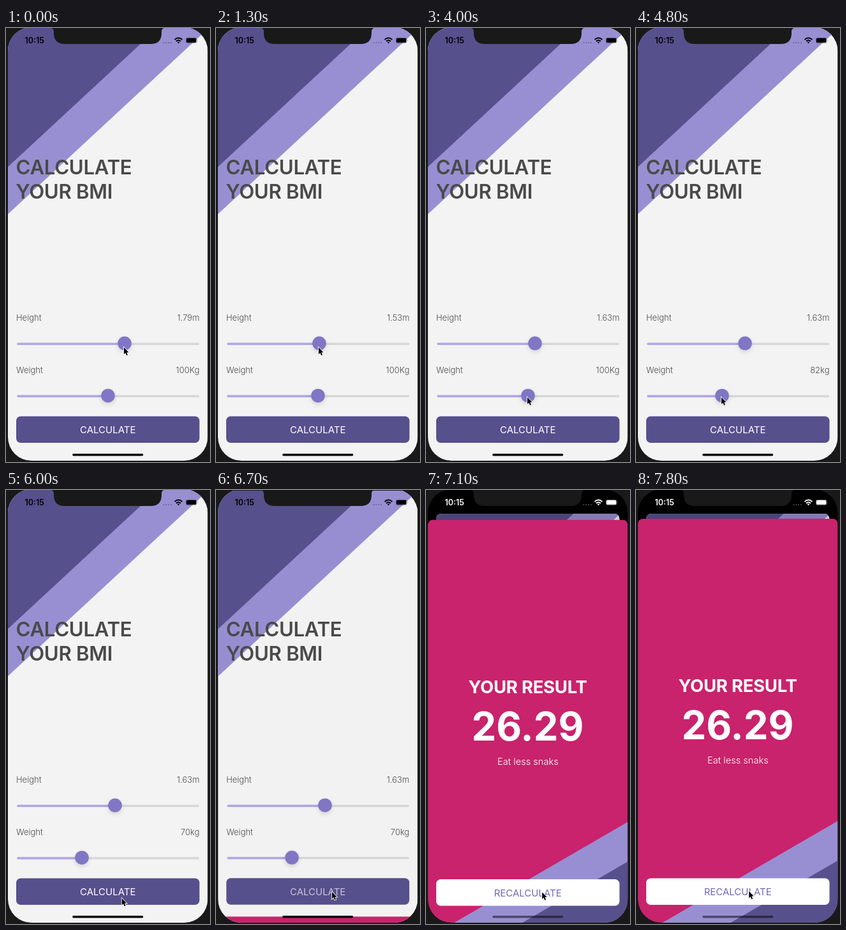
An HTML page that plays this animation: 320 px wide and 679 px high, repeating every 8 s.

```html
<!DOCTYPE html>
<html lang="en">
<head>
<meta charset="utf-8">
<title>BMI calculator</title>
<style>
  html, body { margin: 0; width: 100%; height: 100%; overflow: hidden; background: #191919; }
  svg { display: block; width: 100%; height: 100%; }
  text { font-family: Inter, "Liberation Sans", sans-serif; }
  .title { font-size: 31.2px; font-weight: 600; letter-spacing: -.01em; fill: #4a4a4a; }
  .label { font-size: 13px; font-weight: 300; fill: #4d4d4d; }
  .button { font-size: 15px; text-anchor: middle; }
  .right { text-anchor: end; }
  .mid { text-anchor: middle; fill: #fff; }
  .knob { fill: #8076c5; filter: drop-shadow(0 3px 3px rgba(0, 0, 0, .13)); }
  .track { stroke-width: 3.4; stroke-linecap: round; }
</style>
</head>
<body>
<svg viewBox="0 0 320 679">
  <defs>
    <clipPath id="screen"><rect x="3" y="-1" width="313.5" height="678" rx="37"/></clipPath>
    <clipPath id="cardClip"><rect id="cardShape" x="3" width="313.5" height="700"/></clipPath>
    <clipPath id="sheetClip"><rect x="3" y="45" width="313.5" height="700" rx="8"/></clipPath>
  </defs>
  <rect width="320" height="679" fill="#191919"/>
  <g clip-path="url(#screen)">
    <rect width="320" height="679"/>

    <g id="card"><g clip-path="url(#cardClip)">
      <rect width="320" height="679" fill="#f3f3f3"/>
      <path d="M0 0H318L0 294Z" fill="#988fd3"/>
      <path d="M0 0H238L0 220Z" fill="#56508d"/>
      <text class="title" x="15.5" y="229">CALCULATE</text>
      <text class="title" x="15.5" y="267">YOUR BMI</text>

      <text class="label" x="16" y="458">Height</text>
      <text class="label right" id="heightText" x="303.5" y="458"></text>
      <path class="track" d="M19 494.3H301.5" stroke="#d7d7d7"/>
      <path class="track" id="heightBar" stroke="#b2a7e5"/>
      <circle class="knob" id="heightKnob" cy="493.3" r="10.8"/>

      <text class="label" x="16" y="540">Weight</text>
      <text class="label right" id="weightText" x="303.5" y="540"></text>
      <path class="track" d="M19 576H301.5" stroke="#d7d7d7"/>
      <path class="track" id="weightBar" stroke="#b2a7e5"/>
      <circle class="knob" id="weightKnob" cy="575.2" r="10.8"/>

      <rect x="16" y="607.5" width="287.5" height="41.5" rx="7" fill="#56508d"/>
      <text class="button" id="calc" x="159.7" y="634" fill="#fff">CALCULATE</text>
      <rect id="dim" width="320" height="679"/>
    </g></g>

    <g id="sheet"><g clip-path="url(#sheetClip)">
      <rect y="45" width="320" height="700" fill="#c8236c"/>
      <path d="M320 515.7V745H-76Z" fill="#988fd3"/>
      <path d="M320 577.7V745H31Z" fill="#56508d"/>
      <text class="mid" x="159.5" y="316.3" font-size="27.5" font-weight="700" letter-spacing="-.28">YOUR RESULT</text>
      <text class="mid" x="159.5" y="390.2" font-size="61.5" font-weight="700">26.29</text>
      <text class="mid" x="159.9" y="428" font-size="14.6" font-weight="300">Eat less snaks</text>
      <rect x="16" y="607.5" width="287.5" height="41.5" rx="7" fill="#fff"/>
      <text class="button" x="159.7" y="634" fill="#7468be">RECALCULATE</text>
    </g></g>

    <path id="home" d="M106 667.8H213.5" stroke="#000" stroke-width="3.6" stroke-linecap="round"/>
    <path d="M68-1Q75 0 75 6V8Q75 25 92 25H227Q244 25 244 8V6Q244 0 251-1Z" fill="#191919"/>
    <g id="status">
      <text x="29.5" y="24" font-size="12.5" font-weight="600">10:15</text>
      <path d="M247.5 23H260" stroke="currentColor" stroke-opacity=".35" stroke-width="1.8" stroke-linecap="round" stroke-dasharray="0 3.8"/>
      <path d="M264.6 18.2Q270.5 12.8 276.4 18.2M267 20.8Q270.5 17.6 274 20.8" fill="none" stroke="currentColor" stroke-width="2"/>
      <path d="M268.6 22.2Q270.5 20.6 272.4 22.2L270.5 24.2Z"/>
      <rect x="282.4" y="15.4" width="16.6" height="8" rx="2.3" fill="none" stroke="currentColor" stroke-opacity=".45" stroke-width=".8"/>
      <rect x="283" y="16" width="15.4" height="6.8" rx="1.6"/>
      <path d="M300 18V21Q301.2 19.5 300 18Z" opacity=".5"/>
    </g>
  </g>
  <path id="cursor" d="M0 0V10.6L2.4 8.4 4.1 12.4 5.9 11.6 4.3 7.8H7.5Z" stroke="#fff" stroke-width="1.7" paint-order="stroke"/>
</svg>
<script>
const $ = id => document.getElementById(id);
const clamp = v => Math.max(0, Math.min(1, v));

// Eased value at time t along [time, value] keys
function track(t, ...keys) {
  let [t0, v0] = keys[0];
  for (const [t1, v1] of keys) {
    if (t < t1) {
      const p = clamp((t - t0) / (t1 - t0));
      return v0 + (v1 - v0) * p * p * (3 - 2 * p);
    }
    [t0, v0] = [t1, v1];
  }
  return v0;
}

// Critically damped spring
const spring = s => s <= 0 ? 0 : 1 - (1 + 20 * s) * Math.exp(-20 * s);

function slider(name, x, y, label) {
  $(name + 'Knob').setAttribute('cx', x);
  $(name + 'Bar').setAttribute('d', `M19 ${y}H${x}`);
  $(name + 'Text').textContent = label;
}

function draw(t) {
  const hx = track(t, [400, 186], [1300, 162], [1500, 171], [1600, 171], [1900, 172], [2700, 172], [2800, 171]);
  const wx = track(t, [4000, 160], [4800, 135], [5100, 111], [5300, 119]);
  slider('height', hx, 494.3, (1.63 + (hx - 171) * .01067).toFixed(2) + 'm');
  const kg = Math.round(70 + (wx - 119) * .732);
  slider('weight', wx, 576, kg + (t <= 4000 ? 'Kg' : 'kg'));

  let x, y;
  if (t < 3100) [x, y] = [hx - 1 + track(t, [2300, 0], [2400, .6]), 499.8];
  else if (t < 4000) {
    x = track(t, [3100, 170.6], [4000, 159]);
    y = track(t, [3100, 499.8], [4000, 577.8]);
  } else if (t < 5600) [x, y] = [wx - 1, 577.8];
  else {
    x = track(t, [5600, 118], [6000, 181.7], [7100, 182.2], [7800, 177.2]);
    y = track(t, [5600, 577.8], [6000, 638.8], [6100, 638.8], [6600, 628.8], [7100, 629.3], [7800, 627.8]);
  }
  $('cursor').setAttribute('transform', `translate(${x} ${y})`);

  const p = spring((t - 6689.7) / 1000);
  const k = 1 - .083 * p;
  $('card').setAttribute('transform', `translate(${159.5 * (1 - k)} ${37 * p}) scale(${k})`);
  $('cardShape').setAttribute('rx', 24 - 15 * p);
  $('dim').setAttribute('opacity', .14 * p);
  $('sheet').setAttribute('transform', `translate(0 ${634 * (1 - p)})`);
  $('calc').setAttribute('opacity', track(t, [6400, 1], [6500, .35], [6600, .35], [6800, 1]));
  $('home').setAttribute('opacity', 1 - .5 * clamp(2 * p));

  const c = Math.round(255 * clamp((t - 6760) / 300));
  $('status').style.fill = $('status').style.color = `rgb(${c},${c},${c})`;
}

function frame() {
  draw(Math.floor(performance.now() % 8000 / 100) * 100);
  requestAnimationFrame(frame);
}
frame();
</script>
</body>
</html>
```
